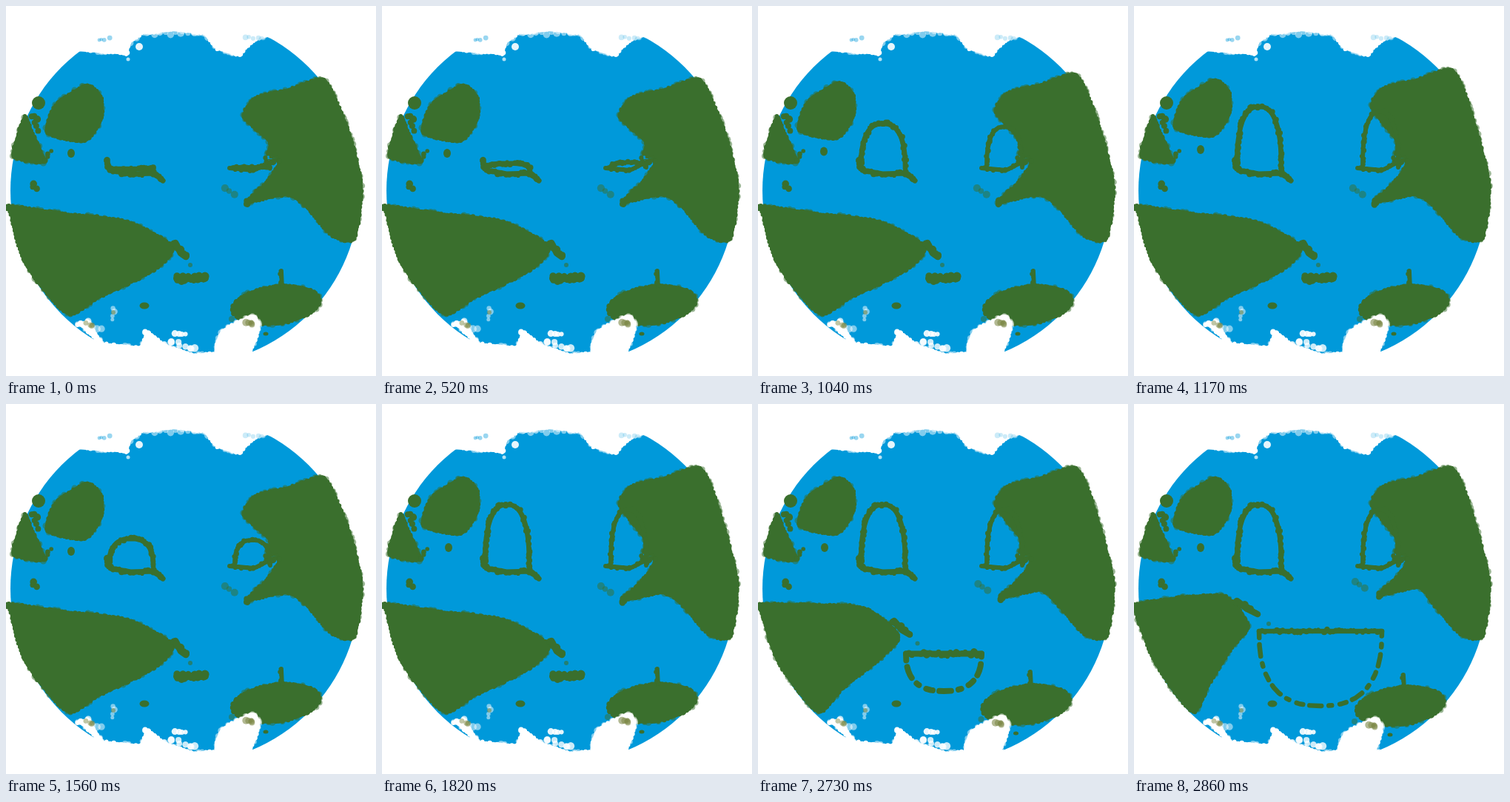
These frames come from a looping animation (500 px wide and 500 px high, 3510 ms). An HTML page:

```html
<!DOCTYPE html>
<html lang="en">
<head>
<meta charset="utf-8">
<title>Earth wakes up</title>
<style>
html, body { margin: 0; width: 100%; height: 100%; overflow: hidden; background: #fff; }
svg { display: block; width: 100vw; height: 100vh; }
</style>
</head>
<body>
<svg id="stage" viewBox="0 0 500 500"></svg>
<script>
const stage = document.getElementById('stage');
const LOOP = 3510;
const BLUE = '#0099da', GREEN = '#3a6f2d', WHITE = '#fff', MOSS = '#7f8b4a';
const SLIT = 22, HALF = 38, OPEN = 84;

// [start ms, eye height, mouth 0..1]
const STEPS = [
  [0, 0, 0], [520, SLIT / 3, 0], [650, SLIT * 2 / 3, 0], [780, SLIT, 0], [910, HALF, 0],
  [1040, (HALF + OPEN) / 2, 0], [1170, OPEN, 0],
  [1560, HALF, 0], [1690, (HALF + OPEN) / 2, 0], [1820, OPEN, 0],
  [2080, HALF, 0], [2210, OPEN, 0], [2730, OPEN, .5], [2860, OPEN, 1]
];

const pts = s => s.split(' ').map(p => p.split(',').map(Number));
const lerp = (a, b, t) => a + (b - a) * t;
const mix = (a, b, t) => a.map((p, i) => p.map((v, k) => lerp(v, b[i][k], t)));
const fix = n => n.toFixed(1);

let seed = 1;
const rnd = () => (seed = seed * 16807 % 2147483647) / 2147483647;

// Closed curve through the key points.
function smooth(keys) {
  const n = keys.length, out = [], at = i => keys[(i + n) % n];
  for (let i = 0; i < n; i++) {
    for (let t = 0; t < 1; t += .125) {
      const h = t * t * (3 - 2 * t), u = t * (1 - t);
      out.push([0, 1].map(k => {
        const a = at(i)[k], b = at(i + 1)[k];
        const va = (b - at(i - 1)[k]) * .38, vb = (at(i + 2)[k] - a) * .38;
        return lerp(a, b, h) + u * ((1 - t) * va - t * vb);
      }));
    }
  }
  return out;
}

// Half superellipse from left to right; positive height points down.
function arch(cx, base, rx, height, power = 2.5) {
  return Array.from({ length: 25 }, (_, i) => {
    const a = Math.PI * i / 24, c = Math.cos(a);
    return [cx - rx * Math.sign(c) * Math.abs(c) ** (2 / power),
      base + height * Math.abs(Math.sin(a)) ** (2 / power)];
  });
}

function oval(cx, cy, rx, ry, tilt) {
  return Array.from({ length: 28 }, (_, i) => {
    const a = Math.PI * i / 14, x = rx * Math.cos(a);
    return [cx + x, cy + ry * Math.sin(a) + x * tilt];
  });
}

const dab = (x, y, r) =>
  `M${fix(x - r)} ${fix(y)}a${fix(r)} ${fix(r)} 0 1 1 ${fix(2 * r)} 0a${fix(r)} ${fix(r)} 0 1 1 ${fix(-2 * r)} 0z`;
const dot = (x, y, rx, fill = GREEN, o = 1, ry = rx) =>
  `<ellipse cx="${fix(x)}" cy="${fix(y)}" rx="${fix(rx)}" ry="${fix(ry)}" fill="${fill}" opacity="${o}"/>`;

// Visit points along a path with the unit normal on its right.
function walk(path, gap, visit) {
  for (let i = 1; i < path.length; i++) {
    const [x, y] = path[i - 1], dx = path[i][0] - x, dy = path[i][1] - y;
    const len = Math.hypot(dx, dy) || 1;
    for (let d = 0; d < len; d += gap) visit(x + dx * d / len, y + dy * d / len, -dy / len, dx / len);
  }
}

// Clockwise outline filled and edged with brush dabs.
function patch(path, id, fill = GREEN, soft = .2) {
  seed = id * 7919;
  let solid = `M${path.join('L')}z`, faint = '';
  walk([...path, path[0]], 5, (x, y, nx, ny) => {
    const r = 2.5 + rnd() * 2, inset = r - rnd() * 1.5;
    solid += dab(x + nx * inset, y + ny * inset, r);
    if (rnd() < soft) faint += dot(x + nx, y + ny, 2.5 + rnd() * 2, fill, .5);
  });
  return `${faint}<path d="${solid}" fill="${fill}"/>`;
}

function brush(path, w, id, dash = '') {
  seed = id * 7919;
  let d = '';
  if (!dash) walk(path, 4, (x, y, nx, ny) => {
    const k = (rnd() - .5) * w * .5;
    d += dab(x + nx * k, y + ny * k, w * (.25 + rnd() * .2));
  });
  return `<polyline points="${path.join(' ')}" fill="none" stroke="${GREEN}" stroke-width="${fix(w * .72)}"
    stroke-linecap="round" stroke-linejoin="round" stroke-dasharray="${dash}"/><path d="${d}" fill="${GREEN}"/>`;
}

// Loose dabs strewn along a line.
function strew(line, count, spread, size, id, fill = GREEN, o = 1) {
  seed = id * 7919;
  const [a, b] = pts(line);
  let s = '';
  for (let i = 0; i < count; i++) {
    const t = (i + .5) / count;
    s += dot(lerp(a[0], b[0], t) + (rnd() - .5) * spread, lerp(a[1], b[1], t) + (rnd() - .5) * spread,
      size * (.7 + rnd() * .6), fill, o);
  }
  return s;
}

const island = pts('107,106 130,122 130,155 106,184 54,172 66,133');
const coast = pts('25,148 36,168 53,212 11,206 10,188');
const west = [
  pts('4,269 80,279 165,290 227,325 200,359 125,396 82,417 25,350 5,282'),
  pts('0,270 60,260 125,259 156,300 134,330 105,376 79,418 28,352 1,284')
];
const east = pts('367,212 352,200 354,184 320,150 336,123 382,111 428,97 447,126 468,180 482,245 472,315 440,312 402,270 378,257 322,267 350,238');
const lidL = pts('136,209 141,222 168,227 200,226 212,236');
const lidR = pts('302,219 335,222 363,208');
const capTop = pts('500,0 500,40 357,40 336,48 315,68 284,59 268,39 230,34 185,38 169,50 164,66 95,61 0,61 0,0');
const capLow = pts('96,428 112,425 131,455 181,460 190,438 217,458 255,470 290,467 335,468 500,468 500,500 0,500 0,455 124,455');
const puff = pts('283,466 292,438 333,418 343,434 331,468 310,472');

function clouds(m) {
  return patch(capTop, 21, WHITE, .4) + patch(capLow, 22, WHITE, .4) +
    strew('122,47 140,42', 4, 5, 3, 30, BLUE, .4) +
    strew('180,37 272,38', 12, 4, 4, 31, WHITE, .5) +
    strew('318,41 350,44', 5, 5, 4, 32, BLUE, .2) +
    dot(180, 55, 5, WHITE, .9) + dot(165, 72, 2.5, WHITE, .7) +
    strew('102,431 128,437', 6, 7, 4, 33, WHITE, .5) +
    strew('109,431 119,432', 4, 6, 3, 34, MOSS, .5) +
    strew('146,405 145,427', 4, 4, 3.5, 35, WHITE, .5) + dot(145, 414, 3, MOSS, .6) +
    strew('227,443 243,444', 4, 3, 3.5, 36, WHITE, .9) +
    strew('213,453 258,461', 9, 8, 4, 37, WHITE, .8) +
    `<g transform="translate(${-7 * m} ${6 * m})">` + patch(smooth(puff), 23, WHITE, .5) +
    strew('295,438 338,424', 7, 7, 4, 38, WHITE, .5) +
    strew('324,430 337,431', 6, 10, 4, 39, MOSS, .6) + dot(305, 423, 4, GREEN, .5) + '</g>';
}

function eyes(height) {
  return brush(lidL, 10, 6) + brush(lidR, 8, 8) +
    brush(arch(169, 220, 30, -height), 9, 7) +
    brush(arch(333, 218, 24, -height * .9), 8, 9);
}

// The small island stretches into the grin.
function mouth(m) {
  const cx = lerp(250, 252, m), top = lerp(368, 307, m), half = lerp(19, 83, m);
  return brush([[cx - half, top], [cx + half, top]], 13 - 4 * m, 10) +
    brush(arch(cx, top, half, 101 * m), 13 - 4 * m, 11, m ? '9 9 16 10 4 11' : '');
}

function draw(height, m) {
  const lift = Math.max(0, (height - HALF) / (OPEN - HALF));
  const raise = ([x, y]) =>
    y < 160 ? [x, y - 13 * lift] : x < 380 && y > 230 ? [x + 6 * m, y - 7 * m] : [x, y];
  const nose = mix(pts('229,320 236,334 243,339'), pts('139,266 153,277 167,284'), m);
  stage.innerHTML =
    dot(242, 249.5, 236, BLUE) +
    patch(smooth(island).map(([x, y]) => [x, y - 7 * lift]), 1) +
    patch(smooth(coast), 2) +
    patch(smooth(mix(...west, m)), 3) +
    patch(smooth(east.map(raise)), 4, GREEN, .4) +
    patch(oval(365 - 5 * m, 404 + 4 * m, 61, 27, -.1), 5) +
    brush([[372 - 8 * m, 358 + 8 * m], [373 - 8 * m, 380 + 4 * m]], 8, 14) +
    dot(44, 131, 9) + strew('38,143 41,173', 6, 8, 4, 40) +
    strew('62,193 54,214', 4, 6, 3.5, 41) + strew('36,240 40,251', 3, 5, 4, 42) +
    dot(88 + 2 * lift, 199 - 5 * lift, 5, GREEN, 1, 6) +
    strew('349,207 367,207', 6, 9, 3.5, 43) + strew('352,203 366,210', 5, 7, 1.5, 44, BLUE, .8) +
    `<g transform="translate(${3 * m} ${-6 * m})">` +
    strew('292,245 312,256', 3, 2, 4.5, 45, GREEN, .5) + '</g>' +
    eyes(height) + brush(nose, 12, 15) +
    dot(lerp(249, 182, m), lerp(350, 297, m), 3, GREEN, .6) +
    mouth(m) +
    dot(187, 405, 6.5, GREEN, 1, 4.5) + dot(351 - 5 * m, 443 + 4 * m, 3.5, GREEN, 1, 2.5) +
    clouds(m);
}

let shown;
const start = performance.now();
function tick(now) {
  const t = Math.max(0, now - start) % LOOP;
  const step = STEPS.findLast(s => s[0] <= t);
  if (step !== shown) {
    shown = step;
    draw(step[1], step[2]);
  }
  requestAnimationFrame(tick);
}
tick(start);
</script>
</body>
</html>
```
